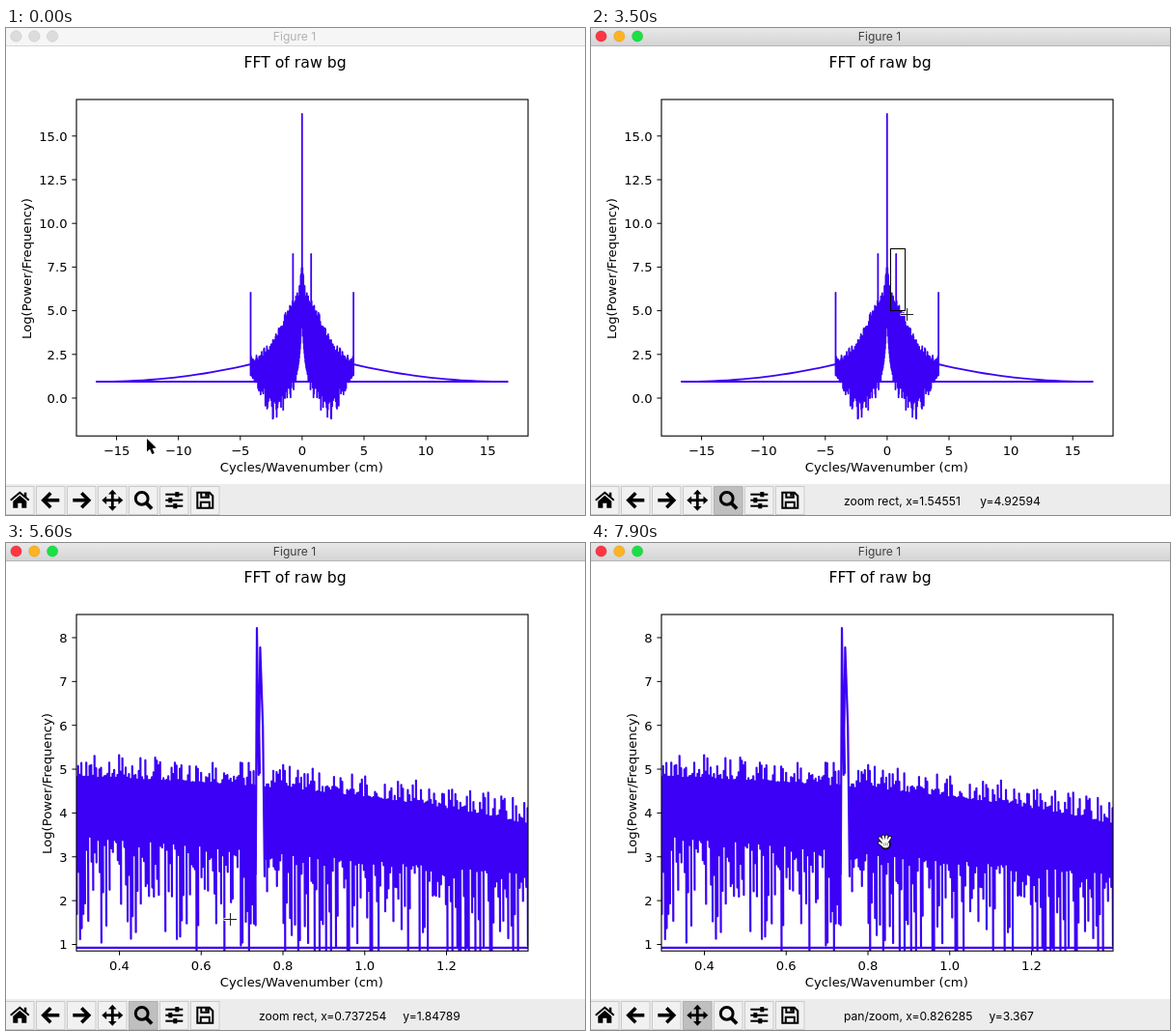
Write an HTML page with a canvas that moves like this. It is 600 px wide and 504 px high and loops after 8 s.

```html
<!DOCTYPE html>
<html lang="en">
<head>
<meta charset="utf-8">
<title>Figure 1</title>
<style>
html, body { margin: 0; width: 600px; height: 504px; overflow: hidden; background: #fff; }
canvas { display: block; }
</style>
</head>
<body>
<canvas id="stage" width="600" height="504"></canvas>
<script>
const ctx = document.getElementById('stage').getContext('2d');
const LOOP = 8000, STEP = 100, BLUE = '#3b00f5';
const ACTIVATE = 500, ZOOM_ON = 800, DRAG = 2900, ZOOMED = 4900, PAN_ON = 6300;
const AXES = { x: 73, y: 74, w: 468, h: 348.2 };
const PLOT_FONT = '13.15px "DejaVu Sans", sans-serif';
const UI_FONT = '12.1px Inter, "Liberation Sans", sans-serif';

const range = (from, to, step) =>
  Array.from({ length: Math.round((to - from) / step) + 1 }, (_, i) => from + i * step);
const smooth = u => u * u * (3 - 2 * u);

function seeded(seed) {
  return () => {
    seed = (seed * 1664525 + 1013904223) >>> 0;
    return seed / 4294967296;
  };
}

// Linear data-to-pixel map of one plot view
class View {
  constructor(x0, sx, y0, sy, rest) {
    Object.assign(this, { x0, sx, y0, sy }, rest);
  }
  px(v) { return this.x0 + this.sx * v; }
  py(v) { return this.y0 - this.sy * v; }
  at(vx, vy) { return [this.px(vx), this.py(vy)]; }
  data(x, y) { return [(x - this.x0) / this.sx, (this.y0 - y) / this.sy]; }
}

const full = new View(306.9, 12.82, 383, 18.08, {
  xt: range(-15, 15, 5), yt: range(0, 15, 2.5),
  xf: String, yf: v => v.toFixed(1), labelX: 26.2, curve: fullCurve(), stroke: 1.8
});
const near = new View(-52, 423.75, 460.86, 45.36, {
  xt: range(0.4, 1.2, 0.2), yt: range(1, 8, 1),
  xf: v => v.toFixed(1), yf: String, labelX: 46.8, curve: nearCurve(), stroke: 2.2
});

const BUTTON_ZOOM = [141, 485], BUTTON_PAN = [108, 484], CORNER = [311, 229];
const path = [
  [200, 146, 425],
  [500, ...BUTTON_ZOOM],
  [900, ...BUTTON_ZOOM],
  [1400, ...full.at(-2.28164, 4.87362)],
  [2500, ...CORNER],
  [DRAG, ...CORNER],
  [3500, ...full.at(1.54551, 4.92594)],
  [4400, ...full.at(1.39831, 0.949506)],
  [5200, ...full.at(1.39831, 0.949506)],
  [5600, ...near.at(0.737254, 1.84789)],
  [5900, 150, 425],
  [6200, ...BUTTON_PAN],
  [6700, ...BUTTON_PAN],
  [7900, ...near.at(0.826285, 3.367)],
  [8000, 305, 309]
];

function position(t) {
  const i = path.findIndex(k => t <= k[0]);
  if (i < 1) return path[i ? path.length - 1 : 0].slice(1);
  const [t0, x0, y0] = path[i - 1], [t1, x1, y1] = path[i];
  if (t === t1) return [x1, y1];
  const u = smooth((t - t0) / (t1 - t0));
  return [x0 + (x1 - x0) * u, y0 + (y1 - y0) * u];
}

// Symmetric spectrum: noisy bell, three pairs of lines and decaying tails
function fullCurve() {
  const rnd = seeded(71), p = new Path2D(), c = 306.8, edge = 53.3, end = 213;
  const pts = [];
  for (let d = 0; d < edge; d += 0.45) {
    const arch = Math.sin(Math.PI * d / edge);
    const top = 349 - 66 * Math.exp(-((d / 28) ** 2)) - 45 * Math.exp(-d / 1.6);
    const low = 300 + 59 * (1 - Math.exp(-d / 2.5)) + 11 * arch;
    pts.push([d, top - 9 * rnd() ** 3]);
    pts.push([d + 0.2, low + 37 * arch ** 1.5 * rnd() ** 2]);
  }
  for (const s of [-1, 1]) {
    pts.forEach(([d, y], i) => p[i ? 'lineTo' : 'moveTo'](c + s * d, y));
    for (const [d, y0, y1] of [[9.4, 234, 310], [edge, 274, 358]]) {
      p.moveTo(c + s * d, y0);
      p.lineTo(c + s * d, y1);
    }
    p.moveTo(c + s * end, 366);
    for (const u of range(0, 1, 0.05)) p.lineTo(c + s * (end - (end - edge) * u), 366 - 18 * u ** 2.1);
  }
  p.moveTo(c, 89);
  p.lineTo(c, 300);
  p.moveTo(c - end, 366);
  p.lineTo(c + end, 366);
  return p;
}

// Close view: sloping noise band with a narrow double peak
function nearCurve() {
  const rnd = seeded(2024), p = new Path2D();
  for (let x = 73; x < 543; x += 1.7) {
    const u = (x - 73) / 468;
    const top = 242 + 22 * u + 28 * u ** 3 - 25 * rnd() ** 2;
    const low = 302 + 40 * u + (110 + 30 * u) * rnd() ** 2;
    if (x > 259.5 && x < 268) continue;
    p.moveTo(x, top);
    p.lineTo(x + 0.4, low);
  }
  p.moveTo(258.8, 343);
  p.lineTo(260, 88);
  p.lineTo(261.8, 240);
  p.lineTo(263.4, 108);
  p.lineTo(266.2, 190);
  p.lineTo(268, 345);
  for (const x of range(260, 262, 0.5)) {
    p.moveTo(x, 172);
    p.lineTo(263, 238);
  }
  p.moveTo(73, 418.8);
  p.lineTo(541, 418.8);
  return p;
}

function text(s, x, y, font, align = 'center', color = '#000') {
  ctx.font = font;
  ctx.textAlign = align;
  ctx.fillStyle = color;
  ctx.fillText(s, x, y);
}

function line(points, width, color = '#000') {
  ctx.beginPath();
  points.forEach(([x, y]) => ctx.lineTo(x, y));
  ctx.lineWidth = width;
  ctx.strokeStyle = color;
  ctx.stroke();
}

function poly(points, fill, outline, width = 1) {
  ctx.beginPath();
  points.forEach(([x, y]) => ctx.lineTo(x, y));
  ctx.closePath();
  if (outline) {
    ctx.lineWidth = width;
    ctx.strokeStyle = outline;
    ctx.stroke();
  }
  ctx.fillStyle = fill;
  ctx.fill();
}

function circle(x, y, r) {
  ctx.beginPath();
  ctx.arc(x, y, r, 0, 2 * Math.PI);
}

function titleBar(active) {
  const g = ctx.createLinearGradient(0, 0, 0, 18);
  g.addColorStop(0, active ? '#e8e8e8' : '#f6f6f6');
  g.addColorStop(1, active ? '#d4d4d4' : '#f6f6f6');
  ctx.fillStyle = g;
  ctx.fillRect(0, 0, 600, 18);
  ctx.fillStyle = active ? '#b5b5b5' : '#d6d6d6';
  ctx.fillRect(0, 18, 600, 1);
  ['#fc3643', '#fdb322', '#19e045'].forEach((color, i) => {
    circle(10.5 + 18.8 * i, 8.5, 5.7);
    ctx.fillStyle = active ? color : '#dcdcdc';
    ctx.fill();
    ctx.lineWidth = 0.6;
    ctx.strokeStyle = active ? 'rgba(0,0,0,.15)' : '#c9c9c9';
    ctx.stroke();
  });
  text('Figure 1', 299, 13, UI_FONT, 'center', active ? '#404040' : '#b2b2b2');
}

function plot(view) {
  ctx.save();
  ctx.beginPath();
  ctx.rect(AXES.x, AXES.y, AXES.w, AXES.h);
  ctx.clip();
  ctx.lineWidth = view.stroke;
  ctx.lineJoin = ctx.lineCap = 'round';
  ctx.strokeStyle = BLUE;
  ctx.stroke(view.curve);
  ctx.restore();

  ctx.lineWidth = 1.1;
  ctx.strokeStyle = '#000';
  ctx.strokeRect(AXES.x, AXES.y, AXES.w, AXES.h);
  for (const v of view.xt) {
    const x = view.px(v);
    line([[x, 422], [x, 426.6]], 1);
    text(view.xf(v).replace('-', '\u2212'), x, 441.5, PLOT_FONT);
  }
  for (const v of view.yt) {
    const y = view.py(v);
    line([[68.4, y], [73, y]], 1);
    text(view.yf(v), 63.5, y + 4.8, PLOT_FONT, 'right');
  }
  text('FFT of raw bg', 299.5, 41.3, '15.7px "DejaVu Sans", sans-serif');
  text('Cycles/Wavenumber (cm)', 306.3, 459.3, PLOT_FONT);
  ctx.save();
  ctx.translate(view.labelX, 249);
  ctx.rotate(-Math.PI / 2);
  text('Log(Power/Frequency)', 0, 0, PLOT_FONT);
  ctx.restore();
}

function arrowIcon(s) {
  line([[-7 * s, 0], [9 * s, 0]], 3.6);
  line([[0, -7.5], [-7.5 * s, 0], [0, 7.5]], 3.6);
}

const icons = [
  function home() {
    poly([[-7, 1], [0, -5], [7, 1], [7, 8], [2, 8], [2, 3], [-2, 3], [-2, 8], [-7, 8]], '#000');
    line([[-9.5, 0], [0, -8], [9.5, 0]], 2);
    ctx.fillRect(4.5, -8, 2.5, 5);
  },
  function back() { arrowIcon(1); },
  function forward() { arrowIcon(-1); },
  function pan() {
    for (let i = 0; i < 4; i++) {
      line([[0, 0], [0, -8]], 2.8);
      poly([[0, -11], [4.3, -6.2], [-4.3, -6.2]], '#000');
      ctx.rotate(Math.PI / 2);
    }
  },
  function zoom() {
    circle(-1.6, -1.8, 6.4);
    ctx.lineWidth = 3;
    ctx.strokeStyle = '#000';
    ctx.stroke();
    line([[3, 3], [8.8, 8.8]], 3.8);
  },
  function sliders() {
    [3, -4, 1].forEach((x, i) => {
      const y = 6 * i - 6;
      line([[-9, y], [9, y]], 2);
      ctx.fillStyle = '#000';
      ctx.fillRect(x - 2, y - 2.6, 4, 5.2);
    });
  },
  function save() {
    line([[-8, -8], [4.5, -8], [8, -4.5], [8, 8], [-8, 8], [-8, -9]], 2);
    line([[-4, -8], [-4, -3], [3.5, -3], [3.5, -8]], 2);
    line([[-4.5, 8], [-4.5, 2], [4.5, 2], [4.5, 8]], 2);
    ctx.fillStyle = '#000';
    ctx.fillRect(0, -8, 2.5, 4);
  }
];

function toolbar(pressed, message) {
  ctx.fillStyle = '#ececec';
  ctx.fillRect(0, 472, 600, 32);
  icons.forEach((icon, i) => {
    const x = 14.3 + 32 * i, down = icon.name === pressed;
    ctx.fillStyle = down ? '#bfbfbf' : '#f1f1f1';
    ctx.fillRect(x - 15, 474, 30, 29.5);
    ctx.lineWidth = 1;
    ctx.strokeStyle = down ? '#b0b0b0' : '#cacaca';
    ctx.strokeRect(x - 14.8, 474.5, 29.5, 29);
    ctx.save();
    ctx.translate(x, 488.7);
    icon();
    ctx.restore();
  });
  text(message, 262, 493.5, UI_FONT, 'left');
}

function crosshair(x, y) {
  for (const [r, w, c] of [[7, 3, 'rgba(255,255,255,.85)'], [6.5, 1, '#222']]) {
    line([[x - r, y], [x + r, y]], w, c);
    line([[x, y - r], [x, y + r]], w, c);
  }
}

function pointer(x, y) {
  const shape = [[0, 0], [0, 13.5], [3.1, 10.8], [5.3, 16], [7.8, 15], [5.6, 9.9], [9.7, 9.6]];
  poly(shape.map(([a, b]) => [x + a, y + b]), '#000', '#fff', 2);
}

function hand(x, y) {
  ctx.save();
  ctx.translate(x, y);
  ctx.lineCap = ctx.lineJoin = 'round';
  for (const [w, c] of [[4, '#111'], [2.2, '#fff']]) {
    for (let i = 0; i < 4; i++) {
      const a = -0.7 + 0.43 * i;
      line([[0, 3], [8.6 * Math.sin(a), 3 - 8.6 * Math.cos(a)]], w, c);
    }
    line([[-6, 1.4], [-1, 5]], w, c);
    circle(0.4, 3, w + 1.4);
    ctx.fillStyle = c;
    ctx.fill();
  }
  for (const a of [-1.3, 0.6, 2.4]) line([[a, 1.5], [a, 4]], 0.6, '#555');
  ctx.restore();
}

const padded = v => String(Number(v.toPrecision(6))).padEnd(12, '\u00a0');

function draw(t) {
  const view = t >= ZOOMED ? near : full;
  const tool = t >= PAN_ON ? 'pan' : t >= ZOOM_ON ? 'zoom' : '';
  // The readout trails the pointer by one step
  const event = position(t), [x, y] = position(t + STEP);
  const inside = x > AXES.x && x < AXES.x + AXES.w && y > AXES.y && y < AXES.y + AXES.h;

  let message = { pan: 'pan/zoom', zoom: 'zoom rect' }[tool] || '';
  if (tool && inside) {
    const [vx, vy] = view.data(...event);
    message += `, x=${padded(vx)}\u00a0y=${padded(vy)}`;
  }

  ctx.fillStyle = '#fff';
  ctx.fillRect(0, 0, 600, 504);
  plot(view);
  if (t > DRAG && t < ZOOMED) {
    const [left, top, right, bottom] = [...CORNER, ...event].map(v => Math.floor(v) - 0.5);
    ctx.lineWidth = 1;
    ctx.strokeStyle = '#000';
    ctx.strokeRect(left, top, right - left, bottom - top);
  }
  titleBar(t >= ACTIVATE);
  toolbar(tool, message);

  if (!inside || !tool) pointer(x, y);
  else if (tool === 'pan') hand(x, y);
  else crosshair(Math.round(x) + 0.5, Math.round(y) + 0.5);
}

const start = performance.now();
function tick(now) {
  const t = Math.max(0, now - start) % LOOP;
  draw(Math.floor(t / STEP) * STEP);
  requestAnimationFrame(tick);
}
draw(0);
requestAnimationFrame(tick);
</script>
</body>
</html>
```
